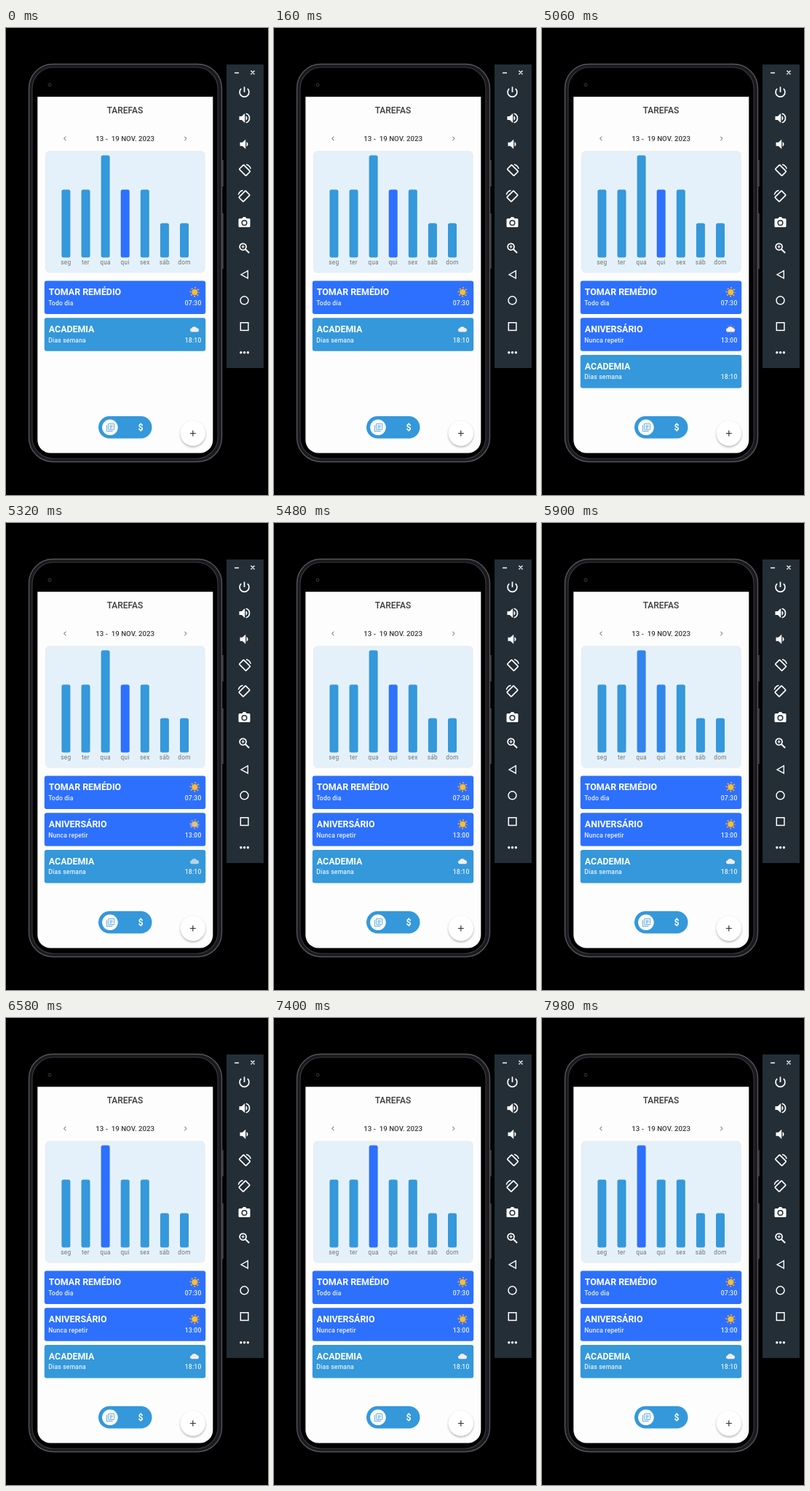
Write an HTML page that moves like this. It is 360x640 px and loops after 8000 ms.

```html
<!DOCTYPE html>
<html lang="pt">
<head>
<meta charset="utf-8">
<style>
html, body { margin: 0; width: 100%; height: 100%; overflow: hidden; background: #000; }
svg { display: block; width: 100vw; height: 100vh; }
text { font-family: Roboto, sans-serif; white-space: pre; }
.title { font-size: 12.4px; font-weight: 700; fill: #fff; }
.small { font-size: 8.6px; font-weight: 500; letter-spacing: .18px; fill: #e8f1fc; }
.day { font-size: 8.3px; letter-spacing: .3px; fill: #6d7378; }
.head { font-weight: 500; fill: #3c3c3e; }
.mid { text-anchor: middle; }
.line { fill: none; stroke: #fff; stroke-width: 1.7; }
.solid { fill: #fff; }
</style>
</head>
<body>
<svg viewBox="0 0 360 640">
  <defs>
    <filter id="shadow" x="-50%" y="-50%" width="200%" height="200%">
      <feDropShadow dx="0" dy="1.5" stdDeviation="1.7" flood-opacity=".35"/>
    </filter>
    <g id="sun">
      <circle r="5.8" fill="none" stroke="#f3a43a" stroke-width="2" stroke-dasharray="1.9 2.655" stroke-dashoffset=".95"/>
      <circle r="4" fill="#fbbd31"/>
    </g>
    <path id="cloud" d="M-4.2 3.8a2.5 2.5 0 0 1-.3-4.9a4.2 4.2 0 0 1 7.4-.3a2.7 2.7 0 0 1 1.2 5.2z" fill="#f5eeea"/>
    <path id="speaker" class="solid" d="M-7-2.5h3.3l4.4-4v13l-4.4-4H-7z"/>
    <g id="rotate" class="line">
      <rect x="-4.3" y="-6.5" width="8.6" height="13" rx="1" transform="rotate(-45)"/>
      <path d="M2-8A8.3 8.3 0 0 1 8.2-2" stroke-width="1.4"/>
    </g>
  </defs>

  <!-- phone -->
  <g stroke="#44444a">
    <path d="M298 181v36M298 254v76" stroke-width="1.6"/>
    <rect x="31.5" y="49.5" width="265" height="545" rx="33" fill="#1a1a1e" stroke="#55555a" stroke-width="1.4"/>
    <rect x="36" y="54" width="255" height="536" rx="29" fill="#000" stroke="#36363b" stroke-width="1.2"/>
  </g>
  <rect x="58" y="76" width="4" height="4" rx="2" fill="none" stroke="#3b3b48"/>
  <path d="M43.3 94.3H284.3V564.5a18 18 0 0 1-18 18H61.3a18 18 0 0 1-18-18z" fill="#fdfdfd"/>

  <text class="head mid" x="163.5" y="117.3" font-size="12">TAREFAS</text>
  <text class="head mid" x="163.7" y="154.8" font-size="9.7">13 -  19 NOV. 2023</text>
  <path d="M82.3 148.8l-2.7 2.7 2.7 2.7M245.3 148.8l2.7 2.7-2.7 2.7" fill="none" stroke="#55555a"/>

  <rect x="54.5" y="169" width="218.5" height="166" rx="5" fill="#e5f1fa" stroke="#e6ebee"/>
  <g id="chart"></g>
  <g id="cards"></g>

  <!-- bottom controls -->
  <rect x="127" y="532" width="73.5" height="30.5" rx="15.2" fill="#3498db"/>
  <circle cx="142.9" cy="547.3" r="10.8" fill="#fff"/>
  <g fill="none" stroke="#5fa9dc">
    <rect x="140.4" y="542.2" width="8.3" height="8.3" rx=".8"/>
    <path d="M138.2 544.2v8.4h8.4M142.3 544.8h4.5M142.3 546.6h4.5M142.3 548.4h3"/>
  </g>
  <text class="title mid" x="185" y="552">$</text>
  <circle cx="256.8" cy="555.5" r="17" fill="#fff" filter="url(#shadow)"/>
  <path d="M252.8 555.5h8M256.8 551.5v8" stroke="#333" stroke-width="1.2"/>

  <!-- emulator toolbar -->
  <rect x="303" y="50" width="51" height="416" fill="#232e36"/>
  <path class="line" style="stroke-width:1.4" d="M314 61.5h6M336.5 58.5l5 5M341.5 58.5l-5 5"/>
  <path class="line" transform="translate(327.5 88)" d="M0-7.5V0M-4.3-4.8a6.4 6.4 0 1 0 8.6 0"/>
  <g transform="translate(327.5 123.5)">
    <use href="#speaker"/>
    <path class="solid" d="M2-3.3a3.7 3.7 0 0 1 0 6.6z"/>
    <path class="line" d="M2.2-6.2a6.4 6.4 0 0 1 0 12.4"/>
  </g>
  <g transform="translate(328.5 159.3)">
    <use href="#speaker"/>
    <path class="solid" d="M2-3.3a3.7 3.7 0 0 1 0 6.6z"/>
  </g>
  <use href="#rotate" transform="translate(328 195)"/>
  <use href="#rotate" transform="translate(327.5 230.5) scale(-1 1)"/>
  <g transform="translate(327.5 266)">
    <path class="solid" d="M-6.5-5h3.3l1.7-2h3l1.7 2h3.3a1.5 1.5 0 0 1 1.5 1.5v9a1.5 1.5 0 0 1-1.5 1.5h-13a1.5 1.5 0 0 1-1.5-1.5v-9a1.5 1.5 0 0 1 1.5-1.5z"/>
    <circle cy="1" r="3.3" fill="none" stroke="#232e36" stroke-width="1.5"/>
  </g>
  <g class="line" transform="translate(327.3 301.5)">
    <circle cx="-1.7" cy="-1.7" r="4.5"/>
    <path d="M1.7 1.7L6.8 6.8" stroke-width="2"/>
    <path d="M-3.9-1.7h4.4M-1.7-3.9v4.4" stroke-width="1.1"/>
  </g>
  <path class="line" style="stroke-width:1.4" d="M332.3 332.7v10.4l-9.3-5.2z"/>
  <circle class="line" style="stroke-width:1.5" cx="327.5" cy="373.3" r="5.5"/>
  <rect class="line" style="stroke-width:1.5" x="322.3" y="403.8" width="10.6" height="10.6"/>
  <g class="solid">
    <circle cx="322.8" cy="444.7" r="1.7"/><circle cx="327.6" cy="444.7" r="1.7"/><circle cx="332.4" cy="444.7" r="1.7"/>
  </g>
</svg>
<script>
const LOOP = 8000, ADDED = 5060;
const BLUE = [45, 112, 253], SKY = [52, 152, 219];
const $ = id => document.getElementById(id);
const ramp = (t, a, b) => Math.min(1, Math.max(0, (t - a) / (b - a)));
const mix = (a, b, k) => `rgb(${a.map((v, i) => Math.round(v + (b[i] - v) * k))})`;

const days = ['seg', 'ter', 'qua', 'qui', 'sex', 'sáb', 'dom'];
const tops = [222, 222, 175, 222, 222, 268, 268];
$('chart').innerHTML = days.map((day, i) => {
  const x = 82.4 + 27.1 * i;
  return `<text class="day mid" x="${x}" y="324">${day}</text>
    <rect id="${day}" x="${x - 6}" y="${tops[i] - .5}" width="12" height="${315 - tops[i]}" rx="2.5" fill="rgb(${SKY})"/>`;
}).join('');

const card = (id, title, repeat, time, color, icons) => `<g id="${id}">
  <rect x="52.8" width="221.4" height="45.5" rx="3" fill="rgb(${color})"/>
  <text class="title" x="58.8" y="19.6">${title}</text>
  <text class="small" x="58.3" y="33.4">${repeat}</text>
  <text class="small" x="268.5" y="33.4" text-anchor="end">${time}</text>
  ${icons.map(i => `<use id="${id}-${i}" href="#${i}" x="259.3" y="15.4"/>`).join('')}</g>`;
$('cards').innerHTML =
  card('pill', 'TOMAR REMÉDIO', 'Todo dia', '07:30', BLUE, ['sun']) +
  card('party', 'ANIVERSÁRIO', 'Nunca repetir', '13:00', BLUE, ['sun', 'cloud']) +
  card('gym', 'ACADEMIA', 'Dias semana', '18:10', SKY, ['cloud']);

const place = (id, slot) => $(id).setAttribute('transform', `translate(0 ${346.5 + 50.8 * slot})`);
place('pill', 0);
place('party', 1);

function draw(now) {
  const t = now % LOOP, added = t >= ADDED;
  const fade = ramp(t, ADDED, ADDED + 380);
  $('party').style.display = added ? '' : 'none';
  place('gym', added ? 2 : 1);
  $('party-sun').style.opacity = .4 + .6 * fade;
  $('party-cloud').style.opacity = 1 - fade;
  $('gym-cloud').style.opacity = added ? fade : 1;
  $('qui').setAttribute('fill', mix(BLUE, SKY, ramp(t, 5300, 6160) ** 1.7));
  $('qua').setAttribute('fill', mix(SKY, BLUE, ramp(t, 5650, 6160)));
  requestAnimationFrame(draw);
}
draw(performance.now());
</script>
</body>
</html>
```
